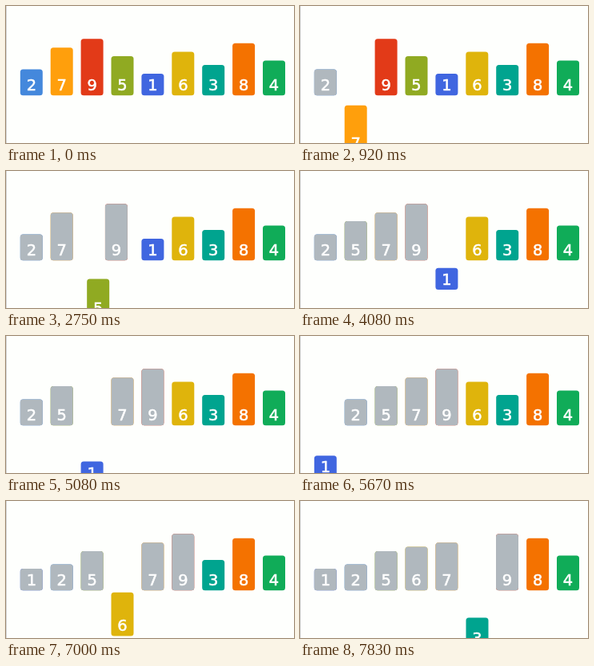
Recreate the animation shown at these times as an HTML page. Size 360 by 172 pixels, loop 8000 ms.

```html
<!DOCTYPE html>
<html lang="en">
<head>
<meta charset="utf-8">
<title>Insertion sort</title>
<style>
  html, body { margin: 0; width: 100%; height: 100%; overflow: hidden; background: #fefffd; }
  svg { display: block; width: 100vw; height: 100vh; }
  text {
    font: 19.4px "DejaVu Sans", sans-serif;
    text-anchor: middle;
    fill: #fff;
    stroke: #fff;
    stroke-width: .55px;
  }
</style>
</head>
<body>
<svg id="stage" viewBox="0 0 360 172">
  <rect width="1" height="172" fill="#d2d3d2"/>
</svg>
<script>
const LOOP = 8000, MOVE = 200, DROP = 72.5;
const LEFT = 17.8, PITCH = 37.9, WIDTH = 28, FLOOR = 112.3;
const ORDER = [2, 7, 9, 5, 1, 6, 3, 8, 4];
const COLORS = ['', '#4066e0', '#4488dc', '#00a48f', '#10ac58', '#90aa22',
  '#dfb40c', '#ff9f0c', '#f47200', '#e23a18'];
const GRAY = '#b0b8be';

// [start ms, action, value, value it changes places with]
const MOVES = [
  [0, 'settle', 2],
  [300, 'drop', 7], [960, 'rise', 7],
  [1290, 'drop', 9], [1855, 'rise', 9],
  [2230, 'drop', 5], [2610, 'swap', 5, 9], [2950, 'swap', 5, 7], [3630, 'rise', 5],
  [3980, 'drop', 1], [4370, 'swap', 1, 9], [4710, 'swap', 1, 7],
  [5090, 'swap', 1, 5], [5320, 'swap', 1, 2], [5630, 'rise', 1],
  [5860, 'drop', 6], [6260, 'swap', 6, 9], [6600, 'swap', 6, 7], [6940, 'rise', 6],
  [7280, 'drop', 3], [7640, 'swap', 3, 9]
];

const stage = document.getElementById('stage');
const clamp = v => Math.max(0, Math.min(1, v));
const ease = p => (1 - Math.cos(Math.PI * p)) / 2;

function add(parent, tag, attrs) {
  const node = document.createElementNS('http://www.w3.org/2000/svg', tag);
  for (const key in attrs) node.setAttribute(key, attrs[key]);
  return parent.appendChild(node);
}

const bars = {};
ORDER.forEach((value, slot) => {
  const height = 21.8 + 5.48 * value;
  const box = { y: FLOOR - height, width: WIDTH, height, rx: 3.5 };
  const group = add(stage, 'g', {});
  add(group, 'rect', { ...box, fill: COLORS[value] });
  const cover = add(group, 'rect', { ...box, fill: GRAY });
  add(group, 'text', { x: WIDTH / 2, y: 106 }).textContent = value;
  bars[value] = { home: slot, group, cover };
});

function render(time) {
  for (const bar of Object.values(bars)) {
    Object.assign(bar, { slot: bar.home, depth: 0, gray: 0 });
  }
  for (const [start, action, value, other] of MOVES) {
    const raw = clamp((time - start) / MOVE);
    if (!raw) break;
    const p = ease(raw), bar = bars[value];
    if (action === 'swap') {
      bar.slot -= p;
      bars[other].slot += p;
    } else if (action === 'drop') {
      bar.depth = p;
    } else {
      if (action === 'rise') bar.depth = 1 - p;
      bar.gray = clamp((raw - .7) / .3);
    }
  }
  for (const { group, cover, slot, depth, gray } of Object.values(bars)) {
    group.setAttribute('transform', `translate(${LEFT + PITCH * slot} ${DROP * depth})`);
    cover.setAttribute('opacity', gray);
  }
}

const begin = performance.now();
function frame() {
  render((performance.now() - begin) % LOOP);
  requestAnimationFrame(frame);
}
frame();
</script>
</body>
</html>
```
